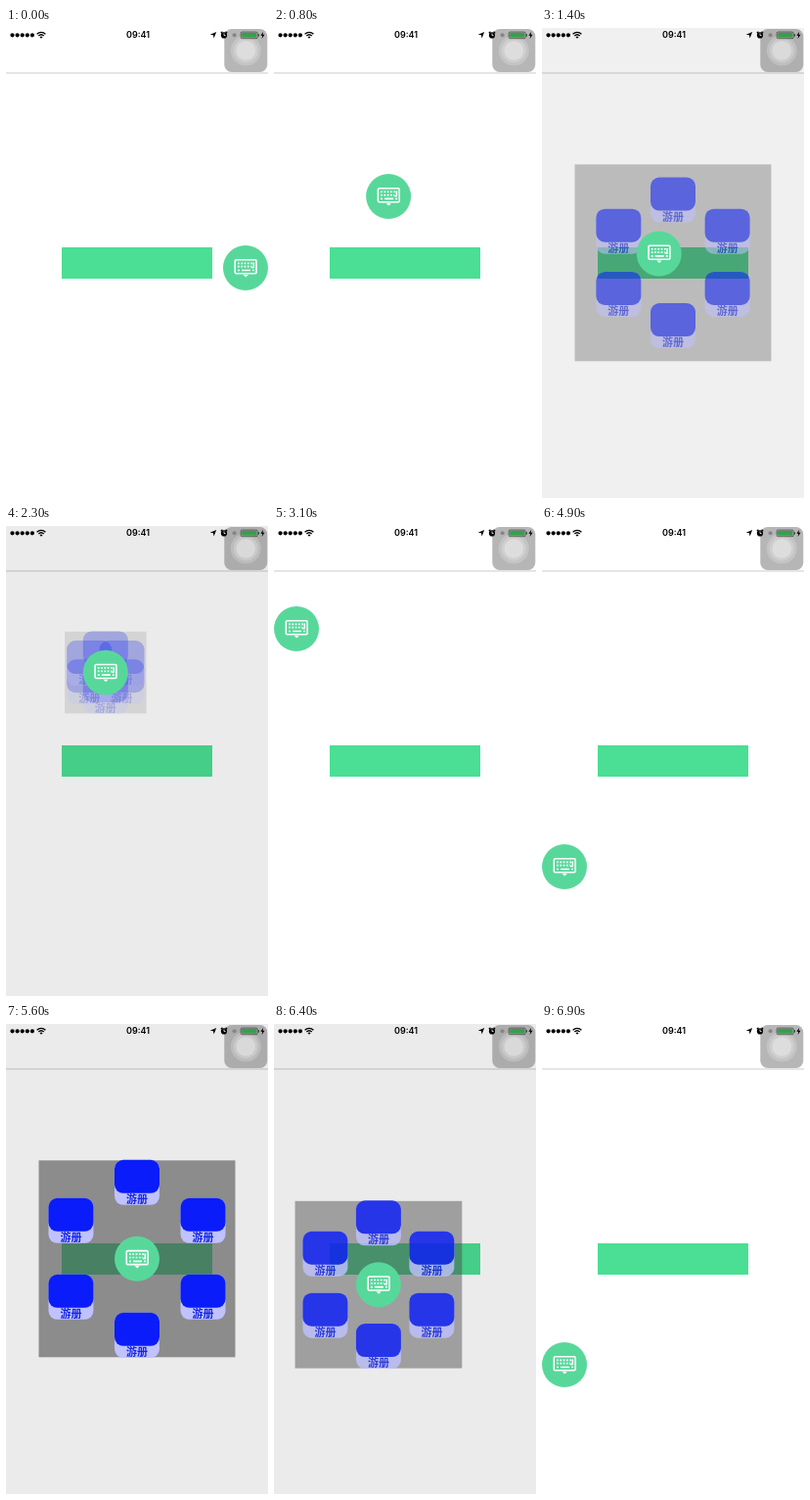
Recreate the animation shown at these times as an HTML page. Size 268 by 480 pixels, loop 8000 ms.

```html
<!DOCTYPE html>
<html lang="zh">
<head>
<meta charset="utf-8">
<title>Floating menu</title>
<style>
  html, body { margin: 0; width: 100%; height: 100%; overflow: hidden; background: #fff; }
  svg { display: block; width: 100vw; height: 100vh; }
  .clock { font: 600 9px Inter, Roboto, sans-serif; text-anchor: middle; }
  .label { font: 900 11px "Noto Sans CJK SC", "Noto Sans CJK", sans-serif; text-anchor: middle; fill: #1424e6; }
</style>
</head>
<body>
<svg viewBox="0 0 268 480">
  <defs>
    <g id="tile">
      <rect x="-23" y="-23" width="46" height="46" rx="9" fill="#bfc2ff"/>
      <rect x="-23" y="-23" width="46" height="34" rx="9" fill="#0a1cfa"/>
      <text class="label" y="21">游册</text>
    </g>
  </defs>

  <rect width="268" height="480" fill="#fff"/>
  <rect y="45.5" width="268" height="1" fill="#cbcbcb"/>
  <rect x="57" y="224" width="154" height="32" fill="#4adf94"/>
  <rect id="dim" width="268" height="480"/>

  <g id="menu">
    <rect id="panel" fill="#4b4b4b"/>
    <g id="tiles"></g>
  </g>

  <g id="button">
    <circle r="23" fill="#57d89a"/>
    <g fill="none" stroke="#fff">
      <rect x="-10.7" y="-8.2" width="21.8" height="14" rx="1.2" stroke-width="1.6"/>
      <path d="M-8 -4.7H9M-8 -1.3H6" stroke-width="1.7" stroke-dasharray="1.8 1.5"/>
      <path d="M8.3 -5.5V-.4H6" stroke-width="1.5"/>
      <path d="M-8 2.5h2M-4 2.5H5M7 2.5h2" stroke-width="1.7"/>
    </g>
    <path d="M-2.4 7H2.8L.2 9.6z" fill="#fff"/>
  </g>

  <g id="status">
    <rect x="223.3" y="1" width="44" height="44" rx="7.5" fill="#646464" fill-opacity=".47"/>
    <g fill="#fff" fill-opacity=".2">
      <circle cx="245.3" cy="23" r="15.5"/>
      <circle cx="245.3" cy="23" r="12.5"/>
      <circle cx="245.3" cy="23" r="9.8" fill-opacity=".3"/>
    </g>
    <path d="M6.5 7.3H28" stroke="#000" stroke-width="4.3" stroke-linecap="round" stroke-dasharray="0 5.1"/>
    <g fill="none" stroke="#000" stroke-width="1.3">
      <path d="M31.6 6.2a6.2 6.2 0 0 1 8.8 0M33.3 8a3.9 3.9 0 0 1 5.4 0"/>
    </g>
    <path d="M34.5 9.2a2.1 2.1 0 0 1 3 0L36 10.8z"/>
    <text class="clock" x="135" y="10.4">09:41</text>
    <path d="M215.2 4L212.6 10.4L212 7.3L208.8 6.7z"/>
    <circle cx="223" cy="7.4" r="3.1"/>
    <path d="M223 5.5V7.5H224.6" fill="none" stroke="#fff" stroke-width=".8"/>
    <path d="M219.8 5.2L221.4 3.8M224.6 3.8L226.2 5.2" stroke="#000" stroke-width="1.2"/>
    <circle cx="233.6" cy="7.3" r="2" fill="#858585"/>
    <rect x="240.2" y="4.1" width="17" height="6.6" rx="1.3" fill="none" stroke="#333" stroke-width=".7"/>
    <rect x="241.1" y="5" width="15.2" height="4.8" rx=".6" fill="#34a04c"/>
    <path d="M258.4 6.2v2.4" stroke="#333"/>
    <path d="M263.2 3.8L260.4 7.8H262.3L261.6 11L264.6 6.7H262.6z"/>
  </g>
</svg>

<script>
const LOOP = 8000, REACH = 78, FULL = 100.5, CX = 134, CY = 239.8;
const $ = id => document.getElementById(id);
const clamp = v => Math.max(0, Math.min(1, v));
const out = (k, n = 2.6) => 1 - (1 - k) ** n;
const inOut = k => k * k * (3 - 2 * k);
const linear = k => k;

// Button stops: time, x, y, easing of the way there
const path = [
  [0, 245, 245],
  [420, 245, 245],
  [800, 118, 172, inOut],
  [1080, 23, 167, out],
  [1210, 23, 167],
  [1560, CX, CY, out],
  [2150, CX, CY],
  [2300, 102, 150, linear],
  [2600, 82, 108, out],
  [2980, 23, 105, inOut],
  [3510, 23, 105],
  [3860, CX, CY, out],
  [4250, CX, CY],
  [4400, 104, 357, linear],
  [4530, 92, 349, out],
  [4860, 23, 348, inOut],
  [5210, 23, 348],
  [5560, CX, CY, out],
  [6350, CX, CY],
  [6850, 23, 348, out],
  [LOOP, 23, 348]
];

// Menu: opening, closing and its length, start and end of the dim's fade
const visits = [
  { open: 1210, close: 2150, shut: 300, fade: [2550, 2950] },
  { open: 3510, close: 4250, shut: 300, fade: [4480, 4850] },
  { open: 5210, close: 6350, shut: 500, fade: [6450, 6850] }
];

const tiles = Array.from({ length: 6 }, () => {
  const use = document.createElementNS("http://www.w3.org/2000/svg", "use");
  use.setAttribute("href", "#tile");
  return $("tiles").appendChild(use);
});

const set = (el, attrs) => {
  for (const name in attrs) el.setAttribute(name, attrs[name]);
};
const move = (el, x, y) => el.setAttribute("transform", `translate(${x} ${y})`);

function buttonAt(t) {
  const i = path.findIndex(stop => stop[0] > t);
  const [t0, x0, y0] = path[i - 1];
  const [t1, x1, y1, ease = linear] = path[i];
  const k = ease((t - t0) / (t1 - t0));
  return [x0 + (x1 - x0) * k, y0 + (y1 - y0) * k];
}

function drawMenu(t, bx, by) {
  const visit = visits.find(v => t >= v.open && t < v.fade[1]);
  $("menu").style.display = visit ? "" : "none";
  if (!visit) return set($("dim"), { opacity: 0 });

  const { open, close, shut, fade } = visit;
  const k = clamp((t - open) / 350);
  const left = 1 - out(clamp((t - close) / shut), 2);
  const closing = t > close;
  const reach = REACH * (closing ? left : out(k, 2.2));
  const half = closing ? reach + FULL - REACH : FULL;
  const [x, y] = closing ? [bx, by] : [CX, CY];
  const alpha = closing ? left : k;

  const lift = clamp((t - fade[0]) / (fade[1] - fade[0]));
  set($("dim"), { opacity: 0.08 * out(k, 1.75) * (1 - lift) });
  set($("panel"), { x: x - half, y: y - half, width: 2 * half, height: 2 * half, opacity: 0.59 * alpha });
  tiles.forEach((tile, i) => {
    const a = (i / 3 - 0.5) * Math.PI;
    move(tile, x + reach * Math.cos(a), y + reach * Math.sin(a));
    set(tile, { opacity: alpha });
  });
}

function draw(now) {
  const t = now % LOOP;
  const [x, y] = buttonAt(t);
  move($("button"), x, y);
  drawMenu(t, x, y);
}

const start = performance.now();
function tick() {
  draw(performance.now() - start);
  requestAnimationFrame(tick);
}
tick();
</script>
</body>
</html>
```
